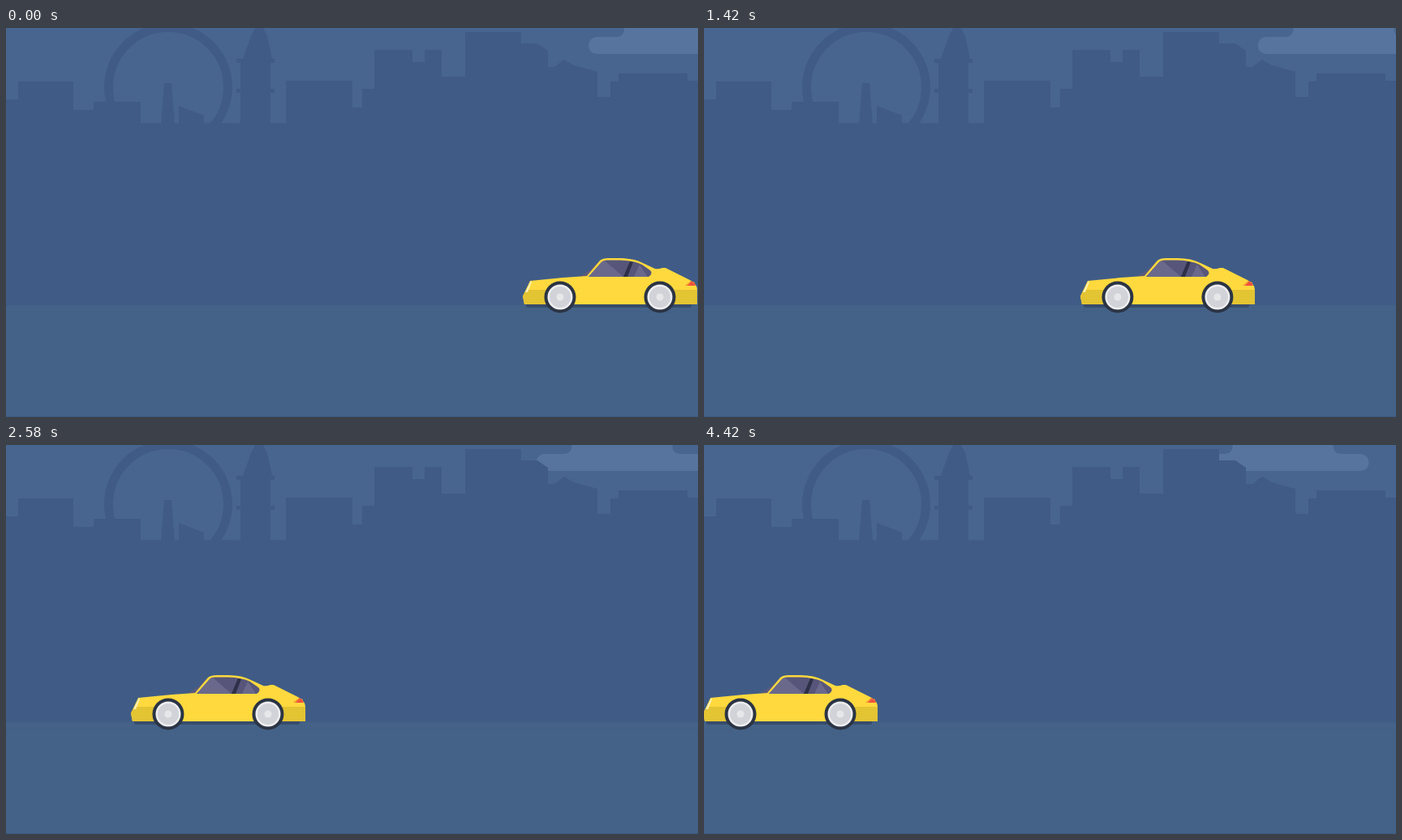
These frames come from a looping animation (853 px wide and 480 px high, 4510 ms). An HTML page:

```html
<!DOCTYPE html>
<html lang="en">
<head>
<meta charset="utf-8">
<title>Car by the river</title>
<style>
  html, body { margin: 0; width: 100%; height: 100%; overflow: hidden; background: #446287; }
  svg { display: block; width: 100vw; height: 100vh; }
</style>
</head>
<body>
<svg viewBox="0 0 853 480">
  <rect width="853" height="120" fill="#48658f"/>
  <path id="cloud" fill="#56749d" d="M10.5 11H34Q44 11 44 0V-20H168V0Q168 11 178 11H201.500a10.500 10.500 0 0 1 0 21H10.500a10.500 10.500 0 0 1 0-21Z"/>

  <!-- skyline -->
  <g fill="#405c86">
    <circle cx="200" cy="73" r="73.500" fill="none" stroke="#405c86" stroke-width="11"/>
    <path d="M0 118V88H15V66H83V101H108V91H166V118Z"/>
    <path d="M191 118L195 68H204L208 118ZM213 118V96L244 108V118Z"/>
    <path d="M289 118V43H284V38H292L302 10L307 0H317L322 10L328 38H331V43H326V118ZM284 75H331V80H284Z"/>
    <path d="M345 118V65H427V98H439V75H454V27H501V42H516V27H537V60H566V5H635V19H655L668 28V48H676L688 39L700 46L729 54V85H745V66H755V56H840V65H853V118Z"/>
    <rect y="117.500" width="853" height="225"/>
  </g>

  <rect y="342" width="853" height="138" fill="#446287"/>
  <rect y="350" width="853" height="1" fill="#426087"/>
  <rect y="479" width="853" height="1" fill="#3e5b82"/>

  <g id="car">
    <rect x="4" y="339" width="204" height="6" rx="2" fill="#374c6c"/>
    <path fill="#5d5b7c" d="M71 306L81 300L96 286L99 288L81 308Z"/>
    <path fill="#ffd93d" d="M2 341L0 331L9 312L50 308L79 306L95 287Q98 284 106 284H120Q137 284 148 290L163 297Q167 298 172 296H176L206 311Q215 316 215 323V341Z"/>
    <path fill="#e3c433" d="M2 341L0 331L4 323H32V341ZM187 323H215V341H187Z"/>
    <path fill="#fff0b0" d="M3 326L10 312L11 314L6 326Z"/>
    <path fill="#57567a" d="M81 307L97 289Q99 286.500 104 286.500H120Q137 287 147 292L157 299Q161 303 155 307Z"/>
    <path fill="#6a698c" d="M81 307L97 289L101 287L124 307ZM137 307L144 292L154 307Z"/>
    <path fill="#2d3048" d="M124 307L132 288L136 289L129 307Z"/>
    <path fill="#f59a32" d="M200 318L207 312L212 314V318Z"/>
    <path fill="#ee5340" d="M203 318L208 312.500Q212 314 213 318Z"/>
    <g id="wheel">
      <circle cx="46" cy="332" r="19.500" fill="#2b3444"/>
      <circle cx="46" cy="332" r="15.500" fill="#eeeef0"/>
      <circle cx="46" cy="332" r="13" fill="#d2d3d8"/>
      <circle cx="46" cy="332" r="4.500" fill="#e7e7ea"/>
    </g>
    <use href="#wheel" x="123"/>
  </g>
</svg>
<script>
const LOOP = 4510, FPS = 12, DRIVE = 4030;
const car = document.getElementById('car');
const cloud = document.getElementById('cloud');

// Cubic Bezier easing (.42, 0, .54, 1), solved by bisection
function ease(x) {
  let lo = 0, hi = 1, s = 0.5;
  for (let i = 0; i < 24; i++) {
    s = (lo + hi) / 2;
    const u = 1 - s;
    if (3 * s * u * u * 0.42 + 3 * s * s * u * 0.54 + s * s * s < x) lo = s;
    else hi = s;
  }
  return s * s * (3 - 2 * s);
}

const moveX = (el, x) => el.setAttribute('transform', `translate(${x.toFixed(2)} 0)`);

function draw(now) {
  const step = Math.floor((now % LOOP + 4) * FPS / 1000);
  const t = Math.min(step, 53) * 1000 / FPS;
  moveX(car, 637 - 638 * ease(Math.min(t / DRIVE, 1)));
  moveX(cloud, 718 - 0.025 * t);
}

const start = performance.now();
function tick() {
  draw(performance.now() - start);
  requestAnimationFrame(tick);
}
tick();
</script>
</body>
</html>
```
